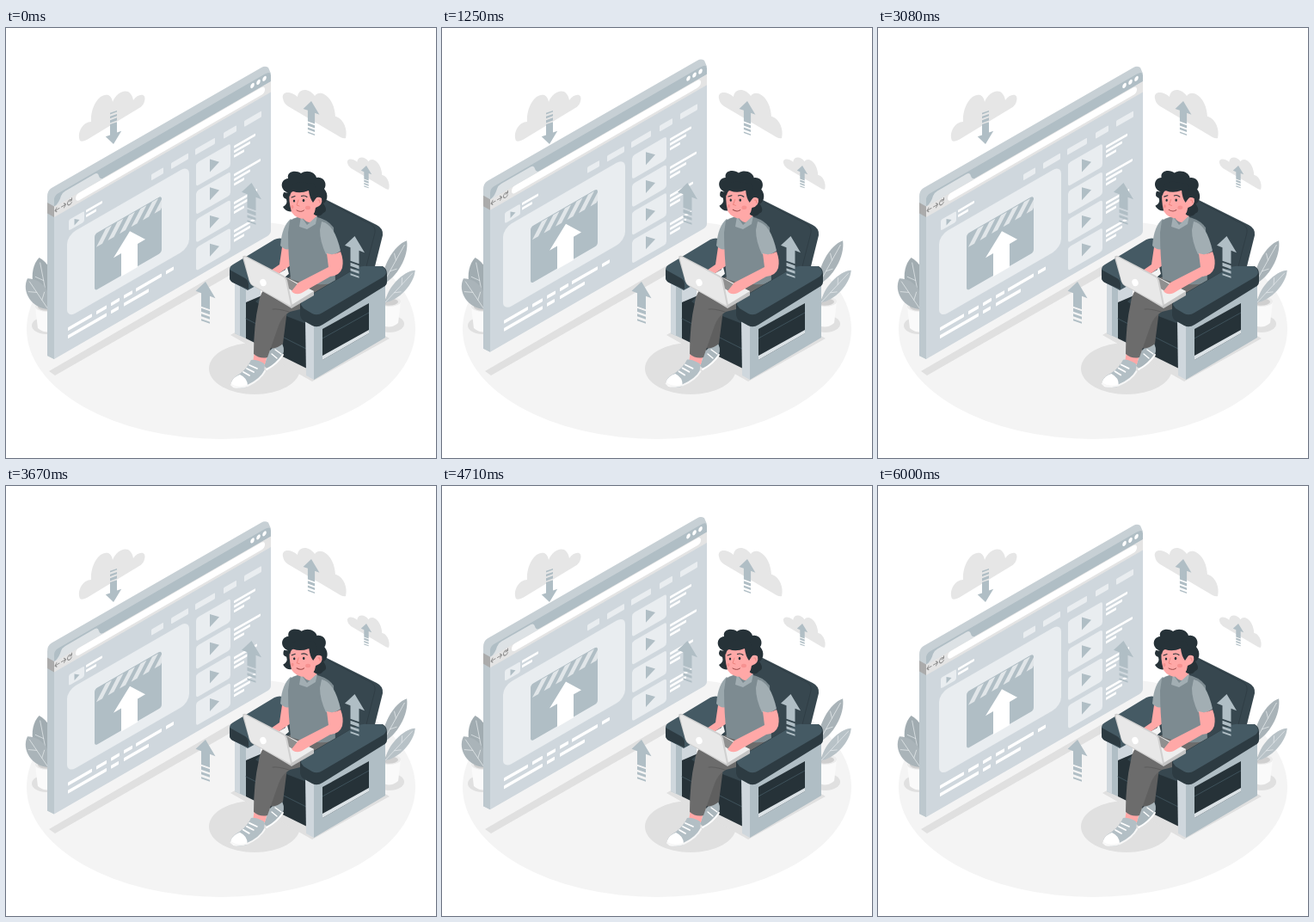
Write an HTML page that moves like this. It is 500 by 500 pixels and loops after 6040 ms.

```html
<!DOCTYPE html>
<html lang="en">
<head>
<meta charset="utf-8">
<title>Upload</title>
<style>
html,body{margin:0;width:100%;height:100%;overflow:hidden;background:#fff}
svg{display:block;width:100vw;height:100vh}
</style>
</head>
<body>
<svg id="stage" viewBox="0 0 500 500"></svg>
<script>
const LOOP = 6040, FLOAT = 3020, RISE = 9, LEAN = 4250;
const dark = '#37474f', darker = '#263238', edge = '#455a64';
const steel = '#b0bec5', pale = '#cfd7dd', mist = '#e9edf0', skin = '#ffa8a7';

const shape = (fill, d, extra = '') => `<path fill="${fill}" d="${d}" ${extra}/>`;
const line = (color, width, d) =>
  `<path fill="none" stroke="${color}" stroke-width="${width}" stroke-linecap="round" stroke-linejoin="round" d="${d}"/>`;
const oval = (fill, x, y, rx, ry = rx, extra = '') =>
  `<ellipse fill="${fill}" cx="${x}" cy="${y}" rx="${rx}" ry="${ry}" ${extra}/>`;
const box = (fill, x1, y1, x2, y2, r = 0) =>
  `<rect fill="${fill}" x="${x1}" y="${y1}" width="${x2 - x1}" height="${y2 - y1}" rx="${r}"/>`;
const group = (body, attrs) => `<g ${attrs}>${body}</g>`;
const dashes = (y, h, spans) => spans.map(([a, b]) => box('#fff', a, y - h / 2, b, y + h / 2, .8)).join('');

function arrow(x, y, size = 1, skew = .36, flip = 1) {
  const d = 'M0 0L11.500 15H5V30.500H-5V15H-11.500ZM-5 32.500H5V36.500H-5ZM-5 39H5V42H-5ZM-5 45H5V47H-5Z';
  return shape(steel, d, `transform="translate(${x} ${y}) matrix(${size} ${size * skew} 0 ${size * flip} 0 0)"`);
}

const cloudColor = '#e6e6e6';
const cloudRight = shape(cloudColor, 'M322 82C320 74 330 72 339 80C340 70 352 69 359 79C366 70 382 81 383 103C391 104 398 117 395 128Q393 129 389 127L328 91Q323 88 322 82Z');
const clouds = shape(cloudColor, 'M86 131C82 121 90 109 99 109C98 91 109 75 119 78Q123 80 124 86C129 73 145 67 148 84C154 75 164 76 161 85C160 91 155 93 150 96L94 130Q88 133 86 131Z')
  + cloudRight + group(cloudRight, 'transform="translate(184.5 103) scale(.66)"');

function leaf(fill, x, y, len, wide, angle) {
  return group(shape(fill, `M0 0C${-wide} ${-len * .25} ${-wide} ${-len * .8} 0 ${-len}C${wide} ${-len * .75} ${wide} ${-len * .25} 0 0Z`)
    + line('#e4e9eb', .7, `M0 0V${-len * .9}M0 ${-len * .3}l${wide * .5} -6M0 ${-len * .55}l${-wide * .5} -6`),
    `transform="translate(${x} ${y}) rotate(${angle})"`);
}
const pot = (x, y) => shape('#fafafa', `M${x - 14} ${y}L${x - 11} ${y + 25}Q${x} ${y + 34} ${x + 11} ${y + 25}L${x + 14} ${y}Z`)
  + oval('#ececec', x, y, 14, 6) + oval('#cfcfcf', x, y + .5, 11, 4.2);

const plants = oval('#e0e0e0', 47, 346, 17, 10) + pot(48, 324)
  + leaf('#a1acb1', 50, 326, 60, 17, -11) + leaf('#aab4b9', 49, 327, 43, 15, -34)
  + oval('#e0e0e0', 446, 344, 17, 10) + pot(445, 318)
  + line('#a9b3b8', 1.2, 'M440 322Q435 308 440 293M440 322Q442 313 448 308')
  + leaf('#a9b3b8', 438, 298, 58, 11, 29) + leaf('#b8c2c7', 441, 319, 51, 10, 43);

function clapper() {
  let stripes = '';
  for (let x = 105; x < 178; x += 13.5) {
    stripes += `M${x} 283L${x + 11} 268H${x + 18}L${x + 7} 283Z`;
  }
  return box(steel, 103, 267, 181, 333, 3.5)
    + `<clipPath id="clapper">${box('#fff', 103, 267, 181, 333, 3.5)}</clipPath>`
    + shape('#e1e6e9', stripes, 'clip-path="url(#clapper)"')
    + shape('#fff', 'M144 287L162 307H153V334H134V307H125Z');
}

function sidebar() {
  let out = '';
  [25, 31, 27, 25].forEach((w, i) => {
    const y = 266 + i * 32.7;
    out += box(mist, 221, y - 13.5, 261, y + 13.5, 3)
      + shape(steel, `M237 ${y - 9}V${y + 6}L248 ${y + .5}Z`)
      + dashes(y - 7, 3, [[265, 265 + w]]) + dashes(y - 1.5, 3, [[265, 284]]) + dashes(y + 4, 3, [[265, 277]]);
  });
  return out;
}

// Front plane: x is the screen x, y is measured along the plane's left edge.
const front = shape(pale, 'M56 219H308V381Q308 385 304 385H56Z')
  + shape(steel, 'M56 208V200Q56 195 61 195H301Q308 195 308 201V208Z')
  + box('#e4e4e4', 56, 207.5, 308, 220)
  + shape('#dde2e5', 'M57 208Q62 206 64 200Q65 197 69 197H103Q107 197 108 202Q109 207 114 208Z')
  + box('#fff', 81, 208.3, 301, 217, 4.2)
  + [286.5, 293.5, 300.5].map(x => oval('#fff', x, 200, 2.3, 2.7)).join('')
  + line('#8d8d8d', 1, 'M62 213H57M59 210.5L57 213L59 215.5M64.5 213H69.5M67.5 210.5L69.5 213L67.5 215.5M76 211.5A2.5 2.8 0 1 0 76.3 214M76.5 209.5V212H74')
  + box(mist, 73, 233, 91, 245.5, 2) + shape(steel, 'M79.5 235.5V243L85.5 240Z')
  + dashes(234.5, 3, [[93, 112]]) + dashes(240, 3, [[93, 105]])
  + [[169, 183], [192, 212], [220, 243], [253, 268], [277, 297]].map(([a, b]) => box(mist, a, 235.5, b, 242.5, 1)).join('')
  + box(mist, 71, 250, 213, 346, 10) + clapper()
  + dashes(359.5, 4, [[72, 100], [105, 117], [122, 132], [137, 147], [151, 181], [186, 195]])
  + dashes(368.5, 4, [[72, 117], [122, 131], [137, 166]])
  + sidebar();

const browser = shape('#c7d0d5', 'M48 196Q48 189 53 186L297 46Q301 43.500 305 46L308 53L62 196L56 206V385L48 381Z')
  + shape('#bdc8ce', 'M48 215L56 219V385L48 381Z')
  + shape('#ababab', 'M48 203L56 207.500V220L48 215.500Z')
  + group(front, 'transform="matrix(1 -.577 0 1 0 32.3)"');

const chairBack = shape('#e0e0e0', 'M261 357L356 411L446 361L350 305Z')
  + shape(dark, 'M322 258L352 205Q358 194 369 198L431 229Q439 233 438 241L428 281L390 302L330 290Z')
  + line('#2e3c43', .8, 'M375 203L424 228Q430 231 429 238L419 277')
  + shape(pale, 'M279 300L296 298V330L279 322Z')
  + shape(steel, 'M266 297L279 304V361L266 355Z') + shape(pale, 'M266 297L272 300V358L266 355Z')
  + shape(darker, 'M279 319L300 310L352 330V397L279 361Z')
  + shape(dark, 'M290 318L330 285L388 298L352 340V345L300 325Z')
  + line(edge, .8, 'M279 338L351 374')
  + shape(edge, 'M260 281Q260 277 264 275L312 246Q318 243 325 246V281L281 305L264 296Q260 294 260 290Z')
  + shape('#2d3b42', 'M260 281L278 291Q282 293 282 298V304L264 296Q260 294 260 290Z');

const chairFront = shape(darker, 'M361 345L432 305V352L361 392Z')
  + line(edge, .8, 'M366 362L422 331')
  + shape(steel, 'M358 344L441 299V360L358 409ZM368 350V386L422 355V320Z', 'fill-rule="evenodd"')
  + shape(pale, 'M348 340L358 345V409L349 404Z')
  + shape('#dbe2e6', 'M368 386L422 355V351L368 381Z')
  + shape('#2d3b42', 'M342 322Q342 318 346 315L407 279Q413 276 419 278L438 277Q443 280 443 286V295Q443 299 439 301L368 345Q362 349 356 346L347 341Q342 338 342 333Z')
  + shape(edge, 'M343 322Q343 318 347 315L406 280Q413 276 420 277L437 277Q444 282 441 287Q440 289 436 291L368 331Q362 335 356 332L346 326Z');

const shoe = shape('#b3bfc5', 'M285 386Q291 385 300 390Q302 398 297 406Q286 414 279 418Q265 421 262 414Q261 408 272 402Q281 395 285 386Z')
  + shape('#fff', 'M262 412Q264 406 272 403Q281 407 281 416Q266 421 263 417Q261 415 262 412Z')
  + line('#f7f7f7', 2, 'M262 415Q270 420 281 416Q296 409 301 399')
  + line('#fff', 1.8, 'M276 400L283 404M280 396L288 400M283 392L292 396');
const legs = shape('#aab6bc', 'M306 376L319 363Q325 372 322 380L305 397L300 393Z')
  + line('#fff', 2, 'M303 397Q316 390 322 380')
  + line('#fff', 1.4, 'M309 379L315 384M313 374L320 379')
  + shape('#5f5f5f', 'M312 318L328 320L322 367Q314 374 307 372Z')
  + shape(skin, 'M289 376L304 380L301 391Q293 393 287 389Z')
  + group(shoe, 'id="foot"')
  + shape('#6c6c6c', 'M305 298L350 283L382 290Q386 304 373 312Q355 325 330 330Q321 335 317 346L304 383Q295 385 288 379Q288 345 294 319Q295 308 305 298Z')
  + line('#5c5c5c', 1, 'M329 330Q316 326 310 327');

const torso = shape(skin, 'M322 248L332 250L331 276L309 291L302 286L318 275Z')
  + shape('#9aa7ac', 'M331 222Q321 230 319 253Q325 260 333 256L338 227Z')
  + shape('#7d8b91', 'M330 224Q341 217 358 219Q374 222 381 232L383 296Q361 302 331 292Q328 263 328 238Z')
  + shape('#a2aeb3', 'M367 225Q382 228 389 259Q382 265 372 263Q365 248 365 235Z')
  + shape(skin, 'M346 209L362 208L361 222Q353 230 346 222Z')
  + shape('#a2aeb3', 'M343 219L350 229L362 218L360 228L350 234L341 231Z');

const forearm = shape(skin, 'M373 262Q381 265 389 260Q393 270 391 279Q388 288 377 289L349 305Q338 313 332 306L340 296L375 278Z');
const laptop = shape('#c4c4c4', 'M286 298L332 326L358 311V306L318 288Z')
  + shape('#eeeeee', 'M286 295L332 322L358 306L318 286Z')
  + shape('#8f8f8f', 'M317 296L337 308L348 303L325 290Z')
  + shape('#d0d0d0', 'M275 267Q275 264 279 265L323 288Q326 290 327 293L333 322L330 324L287 300Q284 298 283 295Z')
  + shape('#e8e8e8', 'M277 268Q276 265 280 267L321 289Q324 290 325 293L331 323L287 299Q284 297 283 294Z')
  + oval('#fff', 299, 296, 3.6, 4.2, 'transform="rotate(-20 299 296)"');

const head = shape(darker, 'M330 192C318 190 318 176 328 175C326 166 338 165 343 169C350 164 360 168 361 174C370 172 374 182 370 187C376 194 373 202 369 204C374 211 372 214 369 215C364 222 357 217 355 213L340 205L334 213Q326 215 322 208Q328 205 326 199Q320 197 323 191Z')
  + shape(skin, 'M330 188L353 186Q356 196 357 202Q361 194 367 198Q369 206 360 209Q359 219 350 222Q338 223 332 214Q328 200 330 188Z')
  + shape(darker, 'M327 193Q329 182 340 179L358 181L363 194L357 203Q353 198 352 189Q342 193 334 190Q331 190 330 196Z')
  + line('#ed847e', 1, 'M340 200L338 206L341 207M363 200Q365 199 365 203')
  + oval('#f79291', 351, 209, 3, 2.2) + oval('#f79291', 333, 208, 1.6, 2)
  + oval(darker, 335, 201, 1.2, 1.6) + oval(darker, 346, 200.5, 1.3, 1.7)
  + line(darker, 1.1, 'M332 197L336 195.500M343.500 195.500Q347 194 350 196.500')
  + line('#9c4a4a', 1, 'M338 212Q343 215 346.500 212');

document.getElementById('stage').innerHTML =
  oval('#f4f4f4', 250, 350, 226, 128) + clouds
  + arrow(125, 135, .8, -.36, -1) + arrow(355, 85, .82) + arrow(419, 160, .54)
  + plants + shape('#e0e0e0', 'M50 399L300 254L310 259L57 404Z')
  + group(browser, 'id="browser"') + arrow(285.5, 180) + arrow(232, 295)
  + oval('#e0e0e0', 289, 396, 53, 30) + chairBack + legs + torso + group(head, 'id="head"')
  + chairFront + laptop + forearm + arrow(405.5, 242);

const move = (id, value) => document.getElementById(id).setAttribute('transform', value);

function render(t) {
  const lift = RISE * (1 - Math.cos(2 * Math.PI * t / FLOAT)) / 2;
  const lean = t < LEAN ? Math.sin(Math.PI * t / LEAN) ** 2 : 0;
  move('browser', `translate(0 ${-lift})`);
  move('head', `rotate(${lean * 3.5} 357 219)`);
  move('foot', `rotate(${lean * 4} 294 386)`);
}

const start = performance.now();
function tick(now) {
  render(Math.max(0, now - start) % LOOP);
  requestAnimationFrame(tick);
}
render(0);
requestAnimationFrame(tick);
</script>
</body>
</html>
```
